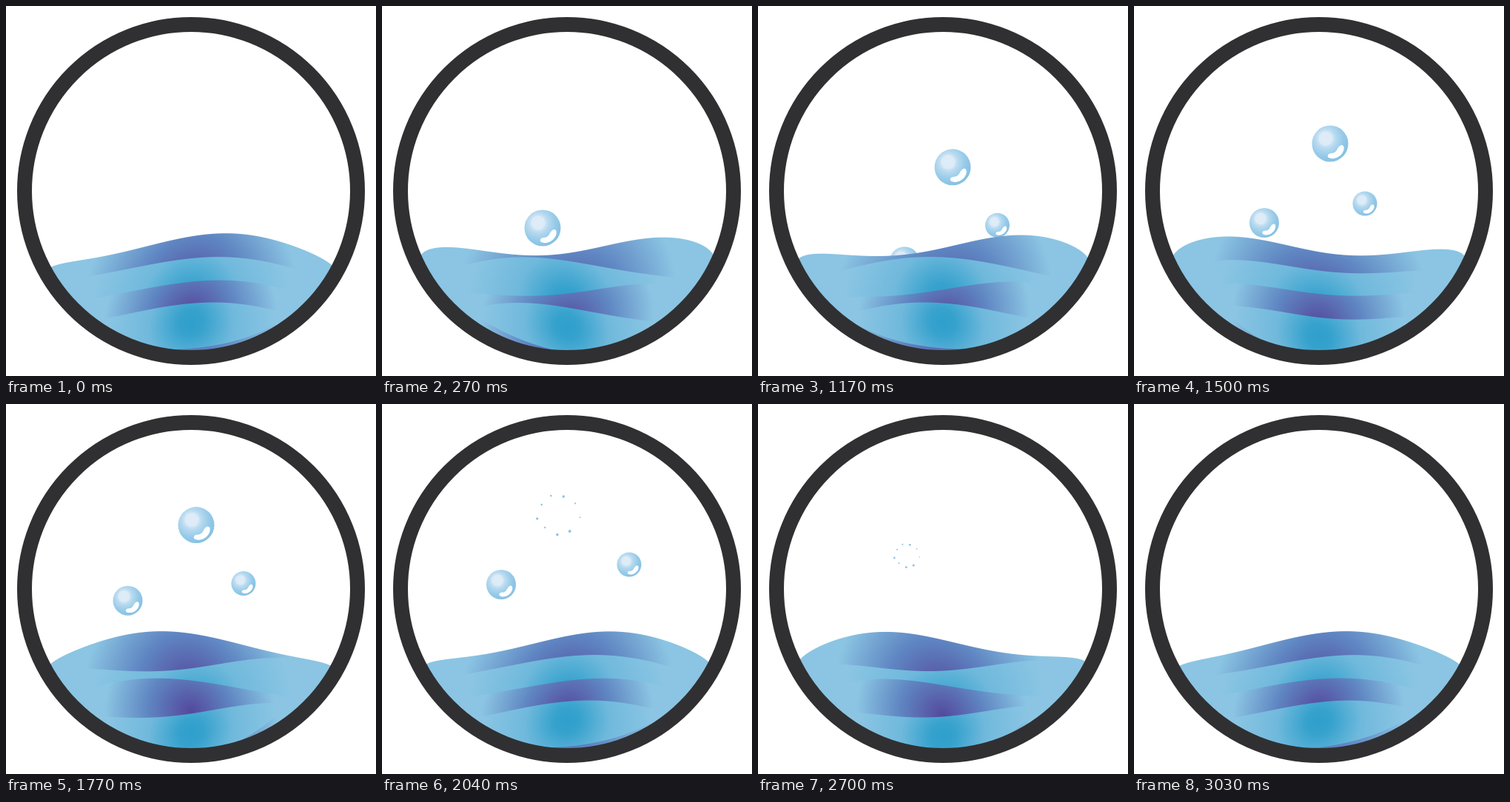
Animation, 500 px wide and 500 px high, one loop 3.06 s. Source, as an HTML page with a canvas:

```html
<!DOCTYPE html>
<html lang="en">
<head>
<meta charset="utf-8">
<title>Water bowl</title>
<style>
  html, body { margin: 0; width: 100%; height: 100%; overflow: hidden; background: #fff; }
  canvas { display: block; width: 500px; height: 500px; }
</style>
</head>
<body>
<canvas id="stage" width="500" height="500"></canvas>
<script>
const ctx = document.getElementById('stage').getContext('2d');
const LOOP = 3060, STEP = 30, WAVE = 400, MID = 250, TAU = Math.PI * 2;
const LIGHT = '#8bc5e3', INK = '#303032', POP_MS = 270, DROPS = 9, UNIT = 24.5;

function radial(x, y, r, ...stops) {
  const g = ctx.createRadialGradient(x, y, 0, x, y, r);
  for (const [at, color] of stops) g.addColorStop(at, color);
  return g;
}
const violet = (y, r) => radial(MID, y, r, [0, '#54489c'], [0.5, '#5f86c2'], [1, LIGHT]);
const teal = (y, r) => radial(MID, y, r, [0, '#2f9fcb'], [0.15, '#36a2cd'], [0.5, '#70b9dc'], [1, LIGHT]);

// Back to front; neighbouring layers drift in opposite directions.
const layers = [
  { level: 322, amp: 15, dir: 1, start: 300, fill: violet(395, 147) },
  { level: 350, amp: 11, dir: -1, start: 290, fill: teal(407, 135) },
  { level: 381, amp: 10.5, dir: 1, start: 292, fill: violet(423, 117) },
  { level: 412, amp: 11.5, dir: -1, start: 282, fill: teal(438, 115), bowl: true }
];

// Key points are [time, x, y]; the bubble bursts at the last one.
const bubbles = [
  { r: 24.5, path: [[30, 200, 350], [270, 217, 300], [840, 254, 250], [1500, 265, 186], [1940, 250, 150]] },
  { r: 16.5, path: [[690, 352, 354], [840, 342, 328], [1500, 312, 267], [2040, 334, 217], [2200, 329, 197]] },
  { r: 20, path: [[1140, 200, 350], [1500, 176, 293], [2040, 161, 244], [2400, 190, 225], [2700, 208, 205]] }
];

const bubbleFill = radial(-6, -7, 33, [0, '#dcebf7'], [0.27, '#d2e6f5'], [0.42, '#b6d9ef'],
                          [0.72, '#95cae8'], [1, '#86c0e3']);
const glint = new Path2D('M15 2C19 1 20 7 17 12C13 19 4 22 -2 19C-5 16 -2 13 2 13C10 13 9 4 15 2Z');

const rand = n => {
  const v = Math.sin(n * 127.1) * 43758.5453;
  return v - Math.floor(v);
};

// Smooth curve through the key points.
function along(path, t) {
  const last = path.length - 1;
  let i = 0;
  while (i < last - 1 && path[i + 1][0] <= t) i++;
  const a = path[i], b = path[i + 1], span = b[0] - a[0], u = (t - a[0]) / span;
  const slope = (j, k) => {
    const p = path[Math.max(j - 1, 0)], q = path[Math.min(j + 1, last)];
    return (q[k] - p[k]) / (q[0] - p[0]) * span;
  };
  return [1, 2].map(k => {
    const d = b[k] - a[k], m = slope(i, k), n = slope(i + 1, k);
    return a[k] + u * (m + u * (3 * d - 2 * m - n + u * (m + n - 2 * d)));
  });
}

function disc(x, y, r, fill) {
  ctx.fillStyle = fill;
  ctx.beginPath();
  ctx.arc(x, y, r, 0, TAU);
  ctx.fill();
}

function drawBubble(r, x, y) {
  ctx.save();
  ctx.translate(x, y);
  ctx.scale(r / UNIT, r / UNIT);
  disc(0, 0, UNIT, bubbleFill);
  disc(-6, -7, 9.5, 'rgba(226,239,249,.65)');
  ctx.fillStyle = '#fff';
  ctx.fill(glint);
  ctx.restore();
}

function drawBurst(r, x, y, age) {
  const scale = r / UNIT, spread = scale * (0.72 + 0.0028 * age);
  for (let i = 0; i < DROPS; i++) {
    const angle = TAU * (i + 0.5 * rand(i + 1)) / DROPS;
    const reach = 25 + 5 * rand(i + 20);
    const dx = reach * Math.cos(angle) - 11, dy = reach * Math.sin(angle);
    disc(x + dx * spread, y + dy * spread, scale * (0.9 + 1.4 * rand(i + 40) ** 2), '#8bc3e0');
  }
}

// Almost flat in the middle, rounding off steeply at the rim.
function sag(d) {
  const u = Math.min(1, d / 200);
  return 40 * (1 - Math.cbrt(1 - u ** 3));
}

function drawLayer(l, t) {
  const u = t / LOOP;
  const sway = l.dir > 0 ? 14 * Math.sin(Math.PI * u) : 0;
  const crest = l.start + l.dir * 3 * WAVE * u + sway;
  ctx.fillStyle = l.fill;
  for (let x = 34; x < 466; x++) {
    const d = Math.abs(x + 0.5 - MID);
    const top = l.level + sag(d);
    const bottom = l.bowl ? MID + 223 * Math.sqrt(Math.max(0, 1 - (d / 200) ** 2)) : 540;
    if (bottom <= top) continue;
    const lift = l.amp * Math.cos(TAU * (x + 0.5 - crest) / WAVE);
    ctx.setTransform(1, 0, 0, 1, 0, -lift);
    ctx.fillRect(x, top, 1, bottom - top);
  }
  ctx.resetTransform();
}

function draw(t) {
  ctx.fillStyle = '#fff';
  ctx.fillRect(0, 0, 500, 500);

  ctx.save();
  ctx.beginPath();
  ctx.arc(MID, MID, 220, 0, TAU);
  ctx.clip();
  for (const { r, path } of bubbles) {
    const [end, x, y] = path[path.length - 1];
    const age = t - end;
    if (t >= path[0][0] && age < 0) drawBubble(r, ...along(path, t));
    else if (age >= 0 && age < POP_MS) drawBurst(r, x, y, age);
  }
  for (const l of layers) drawLayer(l, t);
  ctx.restore();

  ctx.strokeStyle = INK;
  ctx.lineWidth = 20;
  ctx.beginPath();
  ctx.arc(MID, MID, 225, 0, TAU);
  ctx.stroke();
}

const begin = performance.now();
function tick() {
  const t = (performance.now() - begin) % LOOP;
  draw(Math.floor(t / STEP) * STEP);
  requestAnimationFrame(tick);
}
tick();
</script>
</body>
</html>
```
